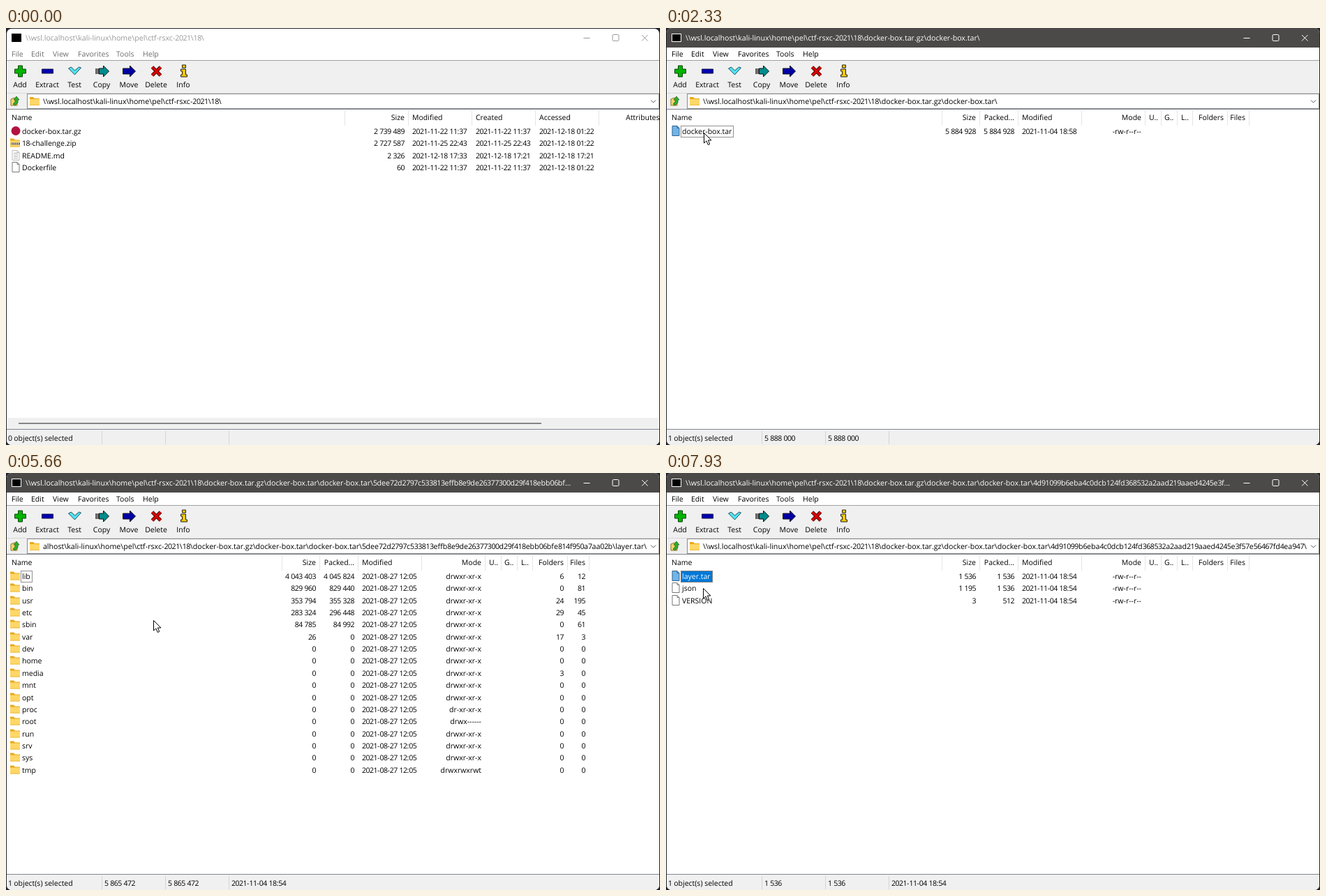
Write an HTML page with a canvas that moves like this. It is 937x598 px and loops after 8000 ms.

```html
<!DOCTYPE html>
<html lang="en">
<head>
<meta charset="utf-8">
<title>Archive browser</title>
<style>
html, body { margin: 0; width: 100%; height: 100%; overflow: hidden; background: #23232f; }
canvas { display: block; }
</style>
</head>
<body>
<canvas id="stage" width="937" height="598"></canvas>
<script>
const ctx = document.getElementById('stage').getContext('2d');
const LOOP = 8000;
const ROW = 17.35;

const HOME = '\\\\wsl.localhost\\kali-linux\\home\\pel\\ctf-rsxc-2021\\18\\';
const GZ = HOME + 'docker-box.tar.gz\\';
const TAR = GZ + 'docker-box.tar\\';
const ROOT = TAR + 'docker-box.tar\\';
const HASH_A = '5dee72d2797c533813effb8e9de26377300d29f418ebb06bfe814f950a7aa02b';
const HASH_B = '4d91099b6eba4c0dcb124fd368532a2aad219aaed4245e3f57e56467fd4ea947';
const HASH_C = '9fe4b6808af55b1cba8de0e09b728d09f52480307744bed28e164167426f03b8';
const HASH_D = '277cb1d569ea184dace14bf1fe3b107122fa64472087074df1b617d8e8fac40c';
const BUILT = '2021-11-04 18:54';
const PACKED = '2021-11-04 18:58';
const BASE = '2021-08-27 12:05';
const FILE_MODE = '-rw-r--r--', DIR_MODE = 'drwxr-xr-x';

// Columns: title, text x, right aligned, separator x
const homeCols = [['Name', 8, 0, 485], ['Size', 571, 1, 576], ['Modified', 582, 0, 667],
  ['Created', 673, 0, 758], ['Accessed', 764, 0, 849], ['Attributes', 888, 0, 940]];
const gzCols = [['Name', 8, 0, 312], ['Size', 421, 1, 426], ['Packed Size', 549, 1, 553],
  ['Modified', 559, 0, 644], ['Host OS', 650, 0, 735], ['CRC', 821, 1, 826], ['Folders', 912, 1, 917]];
const tarCols = [['Name', 8, 0, 395], ['Size', 444, 1, 449], ['Packed...', 499, 1, 504],
  ['Modified', 510, 0, 595], ['Mode', 681, 1, 686], ['U..', 692, 0, 709], ['G..', 714, 0, 732],
  ['L..', 738, 0, 754], ['Folders', 799, 1, 804], ['Files', 830, 1, 835]];

const entry = (icon, name, size, packed, date, mode, dirs = '', files = '') =>
  [icon, name, size, packed, date, mode, '', '', '', dirs, files];
const dir = (name, size, packed, dirs, files, date = BUILT, mode = DIR_MODE) =>
  entry('folder', name, size, packed, date, mode, dirs, files);

const systemDirs = [
  ['lib', '4 043 403', '4 045 824', '6', '12'], ['bin', '829 960', '829 440', '0', '81'],
  ['usr', '353 794', '355 328', '24', '195'], ['etc', '283 324', '296 448', '29', '45'],
  ['sbin', '84 785', '84 992', '0', '61'], ['var', '26', '0', '17', '3'],
  ...'dev home media mnt opt proc root run srv sys tmp'.split(' ')
    .map(name => [name, '0', '0', name === 'media' ? '3' : '0', '0'])
];
const modes = { proc: 'dr-xr-xr-x', root: 'drwx------', tmp: 'drwxrwxrwt' };

const layerFiles = (size, jsonSize, jsonPacked) => [
  entry('tar', 'layer.tar', size, size, BUILT, FILE_MODE),
  entry('page', 'json', jsonSize, jsonPacked, BUILT, FILE_MODE),
  entry('page', 'VERSION', '3', '512', BUILT, FILE_MODE)
];

const views = {
  home: { path: HOME, cols: homeCols, scroll: 767, rows: [
    ['berry', 'docker-box.tar.gz', '2 739 489', '2021-11-22 11:37', '2021-11-22 11:37', '2021-12-18 01:22'],
    ['zip', '18-challenge.zip', '2 727 587', '2021-11-25 22:43', '2021-11-25 22:43', '2021-12-18 01:22'],
    ['lines', 'README.md', '2 326', '2021-12-18 17:33', '2021-12-18 17:21', '2021-12-18 17:21'],
    ['page', 'Dockerfile', '60', '2021-11-22 11:37', '2021-11-22 11:37', '2021-12-18 01:22']] },
  gz: { path: GZ, cols: gzCols, scroll: 852, icon: 'berry', rows: [
    ['tar', 'docker-box.tar', '5 888 000', '2 739 489', '', 'Unix', '75EDECBD']] },
  tar: { path: TAR, cols: tarCols, rows: [
    entry('tar', 'docker-box.tar', '5 884 928', '5 884 928', PACKED, FILE_MODE)] },
  root: { path: ROOT, cols: tarCols, rows: [
    dir(HASH_A, '5 865 881', '5 866 496', '0', '3'),
    dir(HASH_B, '2 734', '3 584', '0', '3'),
    dir(HASH_C, '2 533', '3 072', '0', '3'),
    entry('lines', HASH_D + '.json', '1 845', '2 048', BUILT, FILE_MODE),
    entry('lines', 'manifest.json', '360', '512', '', FILE_MODE),
    entry('page', 'repositories', '93', '512', '', FILE_MODE)] },
  first: { path: ROOT + HASH_A + '\\', title: ROOT + HASH_A.slice(0, 49) + '...', cols: tarCols,
    rows: layerFiles('5 865 472', '406', '512') },
  layer: { path: ROOT + HASH_A + '\\layer.tar\\', title: ROOT + HASH_A.slice(0, 49) + '...',
    cols: tarCols, pathRight: true,
    rows: systemDirs.map(([n, s, p, d, f]) => dir(n, s, p, d, f, BASE, modes[n])) },
  second: { path: ROOT + HASH_B + '\\', title: ROOT + HASH_B.slice(0, 48) + '...', cols: tarCols,
    rows: layerFiles('1 536', '1 195', '1 536') }
};

const stat = {
  archive: ['2 739 489', '2 739 489', '2021-11-22 11:37'],
  outer: ['5 888 000', '5 888 000', ''],
  inner: ['5 884 928', '5 884 928', PACKED],
  dirA: ['5 865 881', '5 866 496', BUILT],
  dirB: ['2 734', '3 584', BUILT],
  layerA: ['5 865 472', '5 865 472', BUILT],
  layerB: ['1 536', '1 536', BUILT]
};

// Start time, view, row marking, marked row, status
const timeline = [
  [0, 'home', '', 0, null],
  [1340, 'home', 'selected', 0, 'archive'],
  [1480, 'gz', 'focus', 0, 'archive'],
  [1990, 'gz', 'selected', 0, 'outer'],
  [2110, 'gz', '', 0, 'outer'],
  [2230, 'tar', 'focus', 0, 'outer'],
  [2790, 'tar', 'selected', 0, 'inner'],
  [2930, 'root', 'focus', 0, 'inner'],
  [3990, 'root', 'selected', 0, 'dirA'],
  [4140, 'first', 'selected', 0, 'layerA'],
  [5160, 'layer', 'focus', 0, 'layerA'],
  [6870, 'first', 'selected', 0, 'layerA'],
  [7070, 'root', 'selected', 0, 'dirA'],
  [7700, 'root', 'selected', 1, 'dirB'],
  [7850, 'second', 'selected', 0, 'layerB']
];
const DIALOG = { start: 2110, end: 2230 };

const pointer = [
  [320, 830, 585], [780, 54, 150], [3380, 54, 150], [3570, 56, 171], [3750, 56, 171],
  [3930, 56, 151], [4200, 56, 151], [4400, 78, 152], [4510, 89, 182], [4560, 89, 182],
  [4590, 90, 204], [4730, 90, 204], [4970, 50, 150], [5210, 50, 150], [5510, 199, 207],
  [5560, 199, 207], [5660, 211, 211], [5930, 211, 211], [6590, 13, 104], [7180, 13, 104],
  [7650, 53, 165], [LOOP, 53, 165]
];

function pointerAt(t) {
  const i = pointer.findIndex(k => t < k[0]);
  if (i < 1) return null;
  const [t0, x0, y0] = pointer[i - 1], [t1, x1, y1] = pointer[i];
  const u = (t - t0) / (t1 - t0), e = u * (2 - u);
  return { x: Math.round(x0 + (x1 - x0) * e), y: Math.round(y0 + (y1 - y0) * e) };
}

// Digits are set tighter than letters, as in the system font.
function text(s, x, y, { color = '#000', size = 10.5, align = 'left' } = {}) {
  ctx.font = `${size}px "Open Sans", "Noto Sans", sans-serif`;
  ctx.textRendering = 'geometricPrecision';
  ctx.fillStyle = color;
  const runs = s.split(/(\d+)/).map(run => {
    const spacing = /^\d/.test(run) ? '-0.5px' : '0px';
    ctx.letterSpacing = spacing;
    return { run, spacing, width: ctx.measureText(run).width };
  });
  const total = runs.reduce((sum, r) => sum + r.width, 0);
  let left = x - (align === 'right' ? total : align === 'center' ? total / 2 : 0);
  for (const { run, spacing, width } of runs) {
    ctx.letterSpacing = spacing;
    ctx.fillText(run, left, y + 4);
    left += width;
  }
  return total;
}

function box(x, y, w, h, fill) {
  ctx.fillStyle = fill;
  ctx.fillRect(x, y, w, h);
}

function outline(x, y, w, h, color, dash = []) {
  ctx.setLineDash(dash);
  ctx.strokeStyle = color;
  ctx.lineWidth = 1;
  ctx.strokeRect(x + .5, y + .5, w - 1, h - 1);
  ctx.setLineDash([]);
}

function shape(points, fill, stroke, width = 1) {
  ctx.beginPath();
  for (let i = 0; i < points.length; i += 2) ctx.lineTo(points[i], points[i + 1]);
  ctx.closePath();
  ctx.fillStyle = fill;
  ctx.fill();
  if (!stroke) return;
  ctx.strokeStyle = stroke;
  ctx.lineWidth = width;
  ctx.stroke();
}

function lines(segments, color, width = 1) {
  ctx.strokeStyle = color;
  ctx.lineWidth = width;
  ctx.beginPath();
  for (const [x0, y0, x1, y1] of segments) { ctx.moveTo(x0, y0); ctx.lineTo(x1, y1); }
  ctx.stroke();
}

function round(x, y, w, h, r) {
  ctx.beginPath();
  ctx.roundRect(x, y, w, h, r);
}

function at(x, y, draw) {
  ctx.save();
  ctx.translate(x, y);
  draw();
  ctx.restore();
}

const sheet = (fill, edge) => {
  shape([-5, -7, 2, -7, 5, -4, 5, 7, -5, 7], fill, edge);
  lines([[2, -7, 2, -4], [2, -4, 5, -4]], edge);
};
const icons = {
  folder() {
    shape([-7, -6, -2, -6, 0, -4, 7, -4, 7, 5, -7, 5], '#e8a91c');
    box(-7, -3, 14, 9, '#ffd768');
    box(-7, 5, 14, 1, '#eebb42');
  },
  zip() {
    icons.folder();
    box(-6, 0, 13, 3, '#6c6a62');
    for (let x = -5; x < 7; x += 3) box(x, 0, 1, 3, '#e8e4d0');
  },
  berry() {
    ctx.fillStyle = '#b3123f';
    ctx.beginPath();
    ctx.arc(0, 0, 6.5, 0, 7);
    ctx.fill();
  },
  page: () => sheet('#fff', '#777'),
  lines() {
    sheet('#fff', '#bbb');
    lines([-3, -.5, 2, 4.5].map(y => [-3, y, 3, y]), '#b4b4b4');
  },
  tar: () => sheet('#70b5ea', '#32648c')
};

const arrow = color => {
  shape([-4, -4, 2, -4, 2, -8, 10, 0, 2, 8, 2, 4, -4, 4], color, '#111');
};
const tools = {
  Add: () => shape([-3, -8, 3, -8, 3, -3, 8, -3, 8, 3, 3, 3, 3, 8, -3, 8, -3, 3, -8, 3, -8, -3, -3, -3],
    '#00b400', '#0a420a'),
  Extract: () => shape([-8, -3, 8, -3, 8, 3, -8, 3], '#0000b4', '#101040'),
  Test: () => shape([-9, -4, -5, -6, 0, -1, 6, -6, 9, -5, 0, 5], '#4fe4f4', '#234c55'),
  Copy() {
    arrow('#008c8c');
    box(-9, -4, 1.5, 8, '#111');
    box(-6.5, -4, 1.5, 8, '#111');
  },
  Move() {
    shape([-9, -4, 1, -4, 1, -8, 9, 0, 1, 8, 1, 4, -9, 4], '#0000a4', '#111');
  },
  Delete() {
    const cross = [[-6, -6, 6, 6], [6, -6, -6, 6]];
    lines(cross, '#4a0808', 5);
    lines(cross, '#e00000', 3);
  },
  Info() {
    shape([-2, -9, 3, -9, 3, -5, -2, -5], '#f5c800', '#222');
    shape([-4, -3, 3, -3, 3, 5, 5, 5, 5, 8, -4, 8, -4, 5, -2, 5, -2, 0, -4, 0], '#f5c800', '#222');
  }
};

function windowButtons(cx, y, color) {
  lines([[cx - 46, y + .5, cx - 37, y + .5], [cx + 37.5, y - 4, cx + 46, y + 4.5],
    [cx + 46, y - 4, cx + 37.5, y + 4.5]], color);
  round(cx - 4.5, y - 4.5, 9, 9, 1.5);
  ctx.stroke();
}

function drawChrome(view, active) {
  box(0, 0, 937, 598, '#23232f');
  round(1, active ? 0 : 1, 935, active ? 598 : 597, 7);
  ctx.fillStyle = '#fff';
  ctx.fill();
  ctx.save();
  ctx.clip();
  if (active) box(0, 0, 937, 28, '#4c4a48');
  box(8, 8, 14, 12, '#000');
  if (active) outline(8, 8, 14, 12, '#fff');
  text(view.title || view.path, 28, 14, { color: active ? '#fff' : '#999', size: 10.65 });
  windowButtons(873.5, 14, active ? '#fff' : '#999');
  const menu = { File: 8, Edit: 36, View: 67, Favorites: 103, Tools: 158, Help: 196 };
  for (const name in menu) text(name, menu[name], 37, { color: active ? '#000' : '#6d6d6d' });

  box(1, 46, 935, 71, '#f0f0f0');
  box(1, 46, 935, 1, '#a0a0a0');
  Object.keys(tools).forEach((name, i) => {
    const x = 20 + 39 * i;
    at(x + .5, 62, tools[name]);
    text(name, x, 81, { align: 'center' });
  });
  box(1, 93, 935, 1, '#d8d8d8');
  box(1, 576, 935, 22, '#f0f0f0');
  ctx.restore();
}

function drawAddress(view, hover) {
  if (hover) {
    box(3, 95, 22, 20, '#d8eaf9');
    outline(3, 95, 22, 20, '#b5d9f5');
  }
  at(13, 105, () => {
    shape([-6, -3, -1, -5, 3, -3, 3, 6, -6, 6], '#f5d467', '#8f7727');
    shape([-3, 4, 0, 1, 0, -2, -2, -2, 2, -7, 6, -2, 4, -2, 4, 2, 0, 6], '#2fae2f', '#185c18', .7);
  });
  box(30, 94, 906, 22, '#fff');
  outline(30, 94, 906, 22, '#8a8a8a');
  at(41, 105, icons[view.icon || 'folder']);
  lines([[924, 103.5, 927.5, 107], [927.5, 107, 931, 103.5]], '#555');
  ctx.save();
  ctx.beginPath();
  ctx.rect(53, 96, 866, 18);
  ctx.clip();
  if (view.pathRight) text(view.path, 918, 105, { size: 10.65, align: 'right' });
  else text(view.path, 53, 105, { size: 10.65 });
  ctx.restore();
}

function drawList(view, mark, marked, mouse) {
  box(1, 116, 935, 460, '#fff');
  box(1, 116, 935, 1, '#828790');
  box(1, 575, 935, 1, '#828790');
  let left = 2;
  view.cols.forEach(([title, x, right, edge]) => {
    const over = mouse && mouse.y >= 118 && mouse.y < 140 && mouse.x >= left && mouse.x < edge;
    if (over) box(left, 118, edge - left, 22, '#d9ebf9');
    text(title, x, 128, { align: right ? 'right' : 'left' });
    box(edge, 118, 1, 22, '#e5e5e5');
    left = edge + 1;
  });
  view.rows.forEach(([icon, ...cells], r) => {
    const y = 148 + r * ROW, top = Math.round(y - 8);
    at(Math.round(icon === 'folder' || icon === 'zip' ? 13 : 13.5), Math.round(y) - .5, icons[icon]);
    cells.forEach((cell, c) => {
      if (c) text(cell, view.cols[c][1], y, { align: view.cols[c][2] ? 'right' : 'left' });
    });
    const width = text(cells[0], 23, y);
    if (!mark || r !== marked) return;
    const w = Math.round(width) + 5;
    if (mark === 'selected') {
      box(21, top, w, 17, '#0078d7');
      outline(21, top, w, 17, '#ff8728', [1, 1]);
      text(cells[0], 23, y, { color: '#fff' });
    } else {
      outline(21, top, w, 17, '#222', [1, 1]);
    }
  });
  if (view.scroll) {
    box(1, 559, 935, 16, '#f0f0f0');
    box(18, 566, view.scroll - 18, 2, '#858585');
  }
}

function drawStatus(key) {
  text(`${key ? 1 : 0} object(s) selected`, 3, 588);
  [137, 228, 319].forEach((x, i) => {
    box(x, 578, 1, 19, '#d5d5d5');
    if (key) text(stat[key][i], x + 4, 588);
  });
}

function drawDialog(t) {
  if (t < DIALOG.start || t >= DIALOG.end) return;
  const u = Math.min(1, (t - DIALOG.start) / 60), scale = .92 + .08 * u;
  ctx.save();
  ctx.globalAlpha = u;
  ctx.translate(660, 346);
  ctx.scale(scale, scale);
  ctx.translate(-660, -346);
  ctx.shadowColor = 'rgba(0,0,0,.34)';
  ctx.shadowBlur = 36;
  ctx.shadowOffsetY = 15;
  round(403.5, 190, 513, 312, 7);
  ctx.fillStyle = '#5d5b59';
  ctx.fill();
  ctx.shadowColor = 'transparent';
  round(405, 218, 510, 282.5, [0, 0, 6, 6]);
  ctx.fillStyle = '#fff';
  ctx.fill();
  text('100% Copying...', 412, 204, { color: '#e4e4e4' });
  windowButtons(853, 204, '#d8d8d8');
  ctx.restore();
}

function drawPointer({ x, y }) {
  at(x + .5, y + .5, () =>
    shape([0, 0, 0, 14.5, 3.4, 11.4, 5.8, 17, 8.2, 16, 5.9, 10.5, 10.4, 10.5], '#fff', '#000'));
}

function render(t) {
  const [, name, mark, marked, status] = timeline.findLast(step => t >= step[0]);
  const view = views[name], mouse = pointerAt(t);
  const overUp = mouse && mouse.x < 25 && mouse.y >= 95 && mouse.y < 115;
  drawChrome(view, t >= 1340);
  drawAddress(view, overUp);
  drawList(view, mark, marked, mouse);
  drawStatus(status);
  drawDialog(t);
  if (mouse) drawPointer(mouse);
}

const began = performance.now();
function tick() {
  render((performance.now() - began) % LOOP);
  requestAnimationFrame(tick);
}
tick();
</script>
</body>
</html>
```
